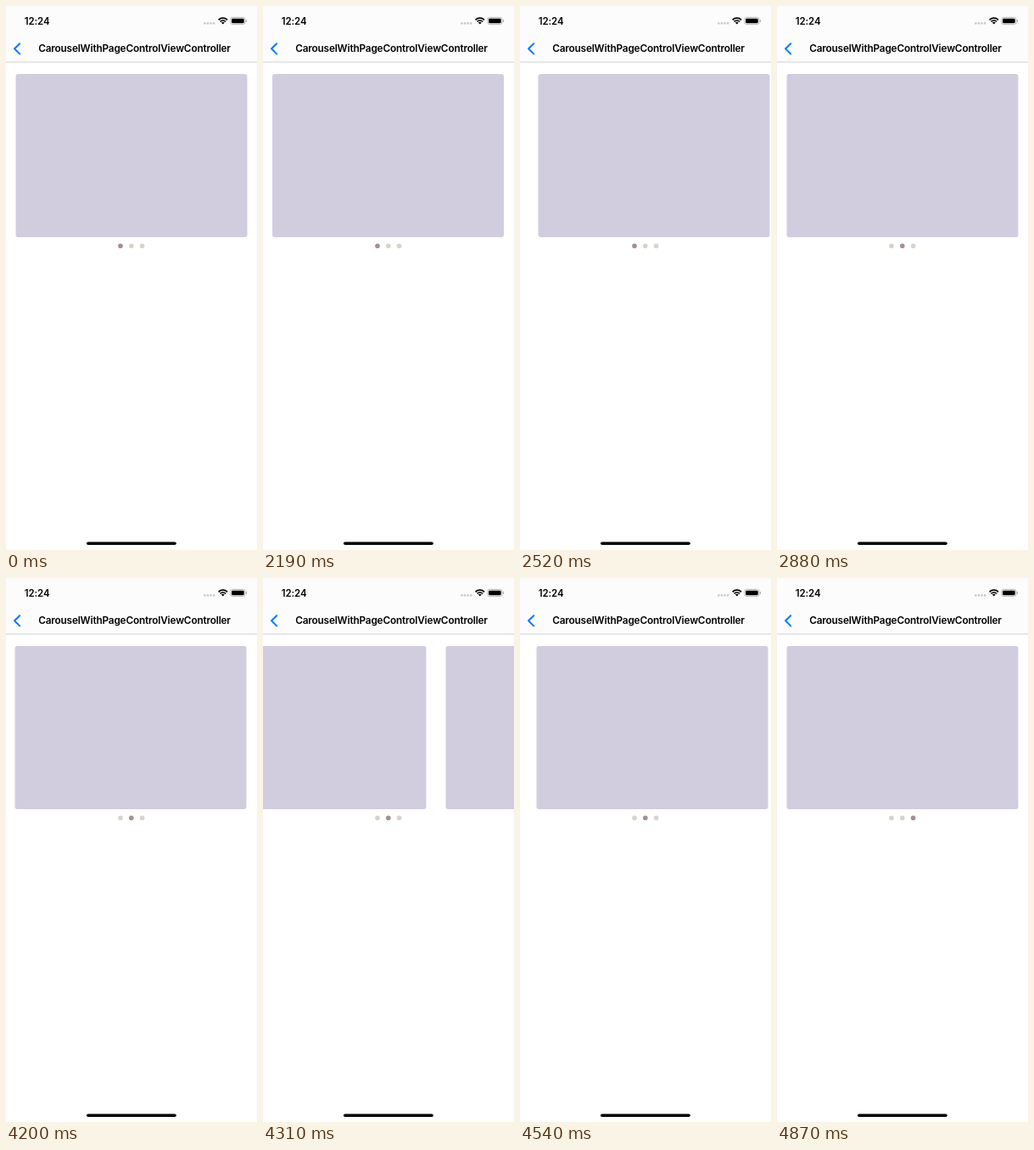
These frames come from a looping animation (296x640 px, 4910 ms). An HTML page with a canvas:

```html
<!DOCTYPE html>
<html lang="en">
<head>
<meta charset="utf-8">
<title>Carousel with page control</title>
<style>
  html, body { margin: 0; width: 100%; height: 100%; overflow: hidden; background: #fff; }
  canvas { display: block; width: 296px; height: 640px; }
</style>
</head>
<body>
<canvas id="stage"></canvas>
<script>
const W = 296, H = 640, LOOP = 4910;
const FONT = 'Inter, "Liberation Sans", sans-serif';
const CARD = { x: 11.5, y: 80, w: 273, h: 192, r: 3 };
const ACTIVE = [164, 142, 145], IDLE = [217, 211, 201];

// Each entry is [start in ms, value held until the next entry].
const SCROLL = [
  [0, 0], [2190, 0.5], [2310, 78], [2420, 228], [2520, 286], [2640, W],
  [4200, W + 1], [4310, W + 92], [4420, W + 232.5], [4540, W + 288], [4650, 2 * W]
];
const PAGE = [[0, 0], [2760, 0.5], [2880, 1], [4750, 1.5], [4870, 2]];

const canvas = document.getElementById('stage');
const ctx = canvas.getContext('2d');
const dpr = window.devicePixelRatio || 1;
canvas.width = W * dpr;
canvas.height = H * dpr;
ctx.scale(dpr, dpr);

function held(steps, t) {
  let value = steps[0][1];
  for (const [start, v] of steps) if (t >= start) value = v;
  return value;
}

function box(x, y, w, h, r, color) {
  ctx.fillStyle = color;
  ctx.beginPath();
  ctx.roundRect(x, y, w, h, r);
  ctx.fill();
}

function disc(x, y, r, color) {
  ctx.fillStyle = color;
  ctx.beginPath();
  ctx.arc(x, y, r, 0, 2 * Math.PI);
  ctx.fill();
}

function label(text, x, y, size, spacing, align) {
  ctx.font = `600 ${size}px ${FONT}`;
  ctx.letterSpacing = spacing + 'px';
  ctx.textAlign = align;
  ctx.fillStyle = '#000';
  ctx.fillText(text, x, y);
}

function drawWifi(x, y) {
  const from = -Math.PI * 0.75, to = -Math.PI * 0.25;
  ctx.strokeStyle = ctx.fillStyle = '#000';
  ctx.lineWidth = 1.7;
  for (const r of [7.4, 4.6]) {
    ctx.beginPath();
    ctx.arc(x, y, r, from, to);
    ctx.stroke();
  }
  ctx.beginPath();
  ctx.moveTo(x, y);
  ctx.arc(x, y, 2.8, from, to);
  ctx.fill();
}

function drawBattery() {
  ctx.strokeStyle = '#a6a6a6';
  ctx.lineWidth = 0.8;
  ctx.beginPath();
  ctx.roundRect(264.8, 13.4, 17.2, 8.2, 2.4);
  ctx.stroke();
  box(266.1, 14.7, 14.6, 5.6, 1.3, '#000');
  box(282.8, 16, 1.1, 3, 0.6, '#a6a6a6');
}

function drawHeader() {
  box(0, 0, W, 66, 0, '#fcfcfc');
  box(0, 65.6, W, 0.8, 0, '#cfcfcf');
  label('12:24', 21.8, 22, 11.4, -0.08, 'left');
  for (let i = 0; i < 4; i++) disc(234.4 + i * 3.6, 20.4, 1.3, '#c9c9c9');
  drawWifi(255.8, 21.6);
  drawBattery();

  ctx.strokeStyle = '#007aff';
  ctx.lineWidth = 2;
  ctx.lineCap = ctx.lineJoin = 'round';
  ctx.beginPath();
  ctx.moveTo(16.2, 44.2);
  ctx.lineTo(10, 50.3);
  ctx.lineTo(16.2, 56.4);
  ctx.stroke();
  ctx.lineCap = 'butt';

  label('CarouselWithPageControlViewController', 151.5, 54.2, 11.8, -0.17, 'center');
}

function drawCards(offset) {
  for (let i = 0; i < 3; i++) {
    box(CARD.x + i * W - offset, CARD.y, CARD.w, CARD.h, CARD.r, '#d1cddf');
  }
}

function drawDots(page) {
  for (let i = 0; i < 3; i++) {
    const k = Math.max(0, 1 - Math.abs(i - page));
    const rgb = IDLE.map((c, n) => Math.round(c + (ACTIVE[n] - c) * k));
    disc(135 + i * 12.8, 282.2, 2.8, `rgb(${rgb})`);
  }
}

function draw(t) {
  box(0, 0, W, H, 0, '#fff');
  drawHeader();
  drawCards(held(SCROLL, t));
  drawDots(held(PAGE, t));
  box(95, 630.4, 105.8, 3.6, 1.8, '#000');
}

const begin = performance.now();
function tick() {
  draw((performance.now() - begin) % LOOP);
  requestAnimationFrame(tick);
}
tick();
</script>
</body>
</html>
```
